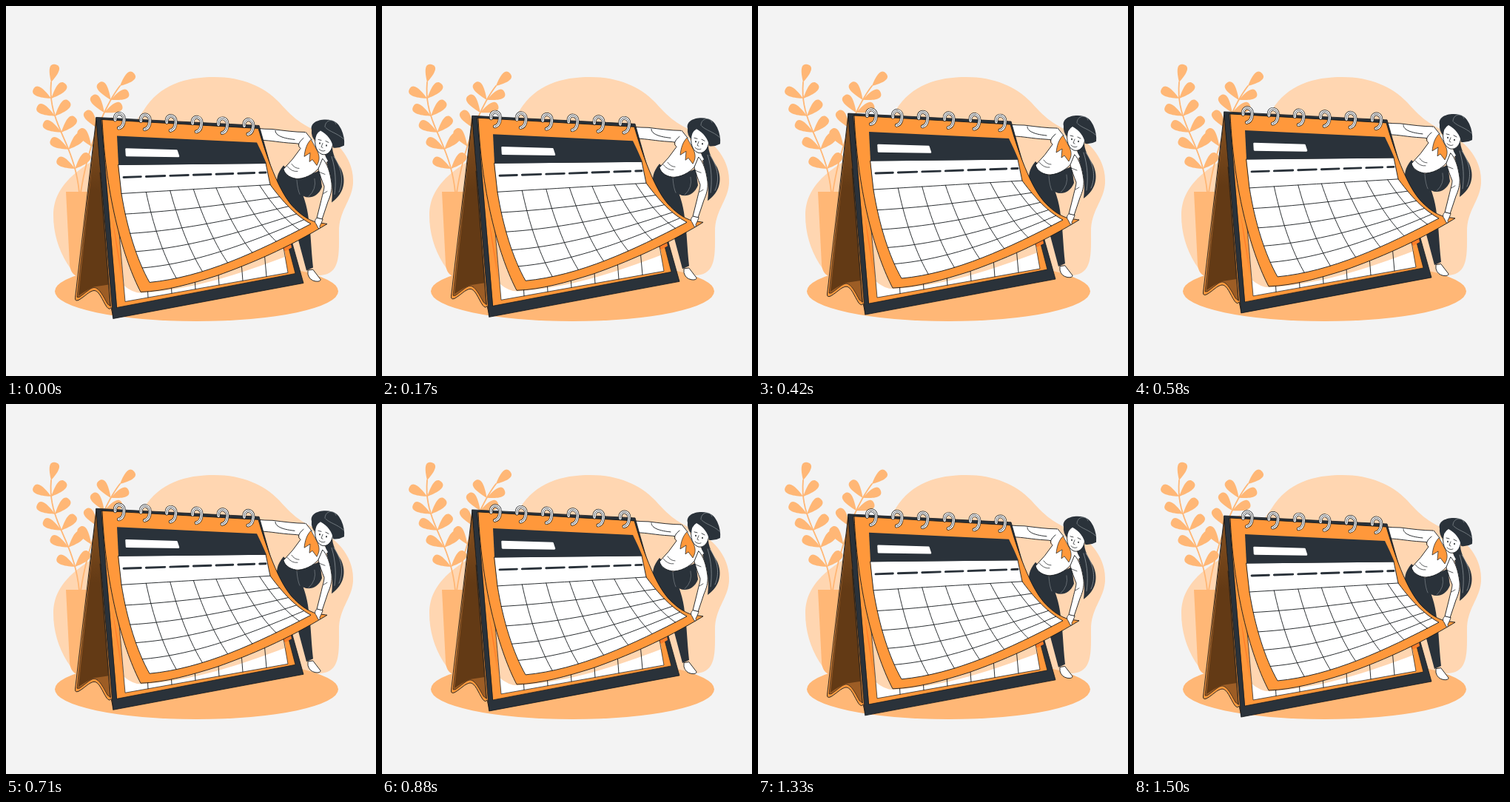
An HTML page with a canvas for the animation above (1540 ms loop, 500 px wide and 500 px high).

```html
<!DOCTYPE html>
<html lang="en">
<head>
<meta charset="utf-8">
<title>Floating calendar</title>
<style>
html, body { margin: 0; width: 100%; height: 100%; overflow: hidden; background: #f3f3f3; }
canvas { display: block; width: 500px; height: 500px; }
</style>
</head>
<body>
<canvas id="stage"></canvas>
<script>
const canvas = document.getElementById('stage');
const ctx = canvas.getContext('2d');
const scale = window.devicePixelRatio || 1;
canvas.width = canvas.height = 500 * scale;

const ORANGE = '#ff983b', MID = '#ffb776', PALE = '#ffd6b1', BROWN = '#9d5d25';
const DARK = '#2a323a', INK = '#15191c', WHITE = '#fff', PAPER = '#f3f3f3';
const LOOP = 1540, STEPS = 37, RISE = 10;

function shape(d, fill, stroke, width = 0.9) {
  const path = new Path2D(d);
  if (fill) { ctx.fillStyle = fill; ctx.fill(path); }
  if (stroke) { ctx.strokeStyle = stroke; ctx.lineWidth = width; ctx.stroke(path); }
}

const line = (d, color = INK, width = 0.9) => shape(d, null, color, width);

function ellipse(x, y, rx, ry, fill) {
  ctx.beginPath();
  ctx.ellipse(x, y, rx, ry, 0, 0, 7);
  ctx.fillStyle = fill;
  ctx.fill();
}

function fade(y0, c0, y1, c1) {
  const g = ctx.createLinearGradient(0, y0, 0, y1);
  g.addColorStop(0, c0);
  g.addColorStop(1, c1);
  return g;
}

const mix = (a, b, t) => [a[0] + (b[0] - a[0]) * t, a[1] + (b[1] - a[1]) * t];

function bezier([a, b, c, d], t) {
  const ab = mix(a, b, t), bc = mix(b, c, t), cd = mix(c, d, t);
  return mix(mix(ab, bc, t), mix(bc, cd, t), t);
}

function sample(point, n = 20) {
  return 'M' + Array.from({ length: n + 1 }, (_, i) => point(i / n)).join('L');
}

// Plants: leaf pairs sit at even steps along a stem.
function leaf([x, y], [dx, dy]) {
  const len = Math.hypot(dx, dy), nx = -dy / len, ny = dx / len;
  const at = (along, side) => `${x + dx * along + nx * side} ${y + dy * along + ny * side}`;
  shape(`M${x} ${y}C${at(0.35, 4.5)} ${at(1, 12)} ${at(1, 0)}C${at(1, -12)} ${at(0.35, -4.5)} ${x} ${y}Z`, MID);
}

function plant(stem, first, step, pairs, tip, left, right) {
  line(sample(t => bezier(stem, t)), MID, 1.8);
  leaf(stem[0], tip);
  for (let i = 0; i < pairs; i++) {
    const base = bezier(stem, first + i * step);
    leaf(base, left);
    leaf(base, right);
  }
}

function drawBackdrop() {
  ctx.fillStyle = PAPER;
  ctx.fillRect(0, 0, 500, 500);
  shape('M186 141C208 106 242 96 282 96C319 96 349 109 369 130C386 149 397 159 420 169' +
    'C451 183 471 210 469 240C467 264 450 276 450 305C450 336 452 362 425 364' +
    'L130 390C91 372 64 330 64 283C64 258 76 238 104 218C148 190 166 170 186 141Z', PALE);
  ellipse(257.5, 385.5, 191.5, 40.5, MID);
  shape('M81 251H132V366H98Q87 363 86 349Z', MID);
  plant([[61, 103], [56, 160], [92, 182], [99, 252]], 0.14, 0.1725, 5, [6, -24], [-24, -13], [19, -20]);
  plant([[154, 108], [138, 128], [112, 180], [101, 252]], 0.23, 0.15, 4, [19, -17], [-16, -23], [24, -10]);
}

function drawWoman() {
  // legs
  shape('M375 215C366 226 364 235 368 247L392 290L394 312L406 357L415 353C412 325 412 305 409 288' +
    'C407 269 402 255 392 232Z', DARK);
  shape('M408 357V362Q410 370 418 371.5Q425 372.500 425 369L415 356Z', WHITE, INK);
  // hair
  shape('M392 234L424 222L427 244C423 254 416 258 409 258C399 258 392 250 392 234Z', DARK);
  shape('M430 195L441 186C440 200 447 209 453 220C460 236 457 253 440 265C442 248 441 234 434 214Z', DARK);
  line('M440 203C446 222 446 240 444 254M443 203C455 220 456 238 450 251', '#aeb4b7', 0.6);
  line('M393 235Q394 248 397 254M417 233Q420 247 409 257', '#8b9297', 0.6);
  // reaching arm and torso
  shape('M340 165Q350 166 360 166C376 168 391 170 404 170L406 187C399 187 394 185 388 185' +
    'C370 184 357 181 346 181Z', WHITE, INK);
  line('M364 168C364 173 370 178 390 180');
  shape('M405 170C394 177 395 184 398 192Q388 207 375 220C377 228 386 233 395 233' +
    'C408 232 419 224 425 216L435 209L428 196L414 180Z', WHITE);
  line('M405 170L413 180M402 178Q391 187 398 192Q388 207 375 220C377 228 386 233 395 233' +
    'C408 232 419 224 425 216');
  line('M380 216Q386 224 394 223M386 213Q390 219 396 219', INK, 0.7);
  // holding arm
  shape('M428 206C434 212 438 224 440 239C441 249 438 257 435 264L427 288L420 286L426 262' +
    'C428 253 430 248 430 243C427 236 424 227 422 220Z', WHITE, INK);
  line('M421 223L431 227M429 253L434 250', INK, 0.7);
  // scarf and face
  shape('M412 180C406 186 404 194 403 203L411 198L410 210L414 207L420 215C424 208 424 203 421 196Z',
    ORANGE, INK, 0.7);
  shape('M419 167C416 182 417 196 427 200C435 202 441 195 442 184L434 166Z', WHITE, INK);
  shape('M413 167C411 159 419 153 432 153C444 153 449 158 453 166Q458 177 457 188Q450 192 442 191' +
    'C441 181 434 173 425 168Q418 172 418 182Q412 176 413 167Z', DARK);
  line('M431 163C431 153 443 151 446 159M432 164C438 170 447 171 456 179', '#9ca4a8', 0.6);
  line('M422 180L426 181M432 182L436 184', INK, 0.8);
  ellipse(424, 185, 0.8, 1.2, INK);
  ellipse(433, 188, 0.8, 1.2, INK);
  line('M428 185L426 190L428 191M423 193Q427 197 431 195', INK, 0.7);
}

function drawStand() {
  shape('M122 151L93.5 394Q93 399 98 397C107 392 112 385 119 384C126 384 130 397 136 406' +
    'Q140 411 142 407L145 420Z', ORANGE, INK);
  shape('M122 155L96 393L99 393C108 387 113 381 119 380C126 380 132 393 137 402L141 405Z',
    BROWN, INK, 0.7);
  shape('M122 160L128 236L139 376L119 379Q111 382 98 391L114 238Z', fade(165, '#85501f', 250, '#633a15'));
  line('M127 225L141 405', INK, 0.7);
}

function drawBoard() {
  shape('M122 150L342 161L402 374L145 422Z', DARK, INK, 0.8);
  shape('M129 153L340 165L391 361L150 407Z', ORANGE, INK, 0.7);
  shape('M144 288L161 382L155 366Z', fade(300, '#ff6f1e', 375, ORANGE));
  shape('M152 295L370 300L381 360L161 399Z', WHITE);
  shape('M152 295L159 377Q173 389 187 387C254 382 315 362 378 338L370 300Z', PALE);
  shape('M372 324L384 317L386 326L377 331Z', '#ff7d29');
  line('M152 295L161 399L381 360L374 320', INK, 0.7);
  for (let x = 192; x < 360; x += 32) line(`M${x - 4} 320L${x} ${399 - (x - 161) * 0.177}`);
}

// The grid is a surface spanned by its four curved edges.
const edge = {
  top: [[156, 253], [223, 249], [290, 245], [357, 241]],
  bottom: [[194, 373], [267, 366], [339, 332], [412, 294]],
  left: [[156, 253], [163.5, 300], [177, 343], [194, 373]],
  right: [[357, 241], [379, 271], [397, 286], [412, 294]]
};

function surface(u, v) {
  const across = mix(bezier(edge.left, v), bezier(edge.right, v), u);
  const down = mix(bezier(edge.top, u), bezier(edge.bottom, u), v);
  const flat = mix(mix(edge.top[0], edge.top[3], u), mix(edge.bottom[0], edge.bottom[3], u), v);
  return [0, 1].map(i => across[i] + down[i] - flat[i]);
}

// Columns narrow slightly with distance.
const columnAt = k => k * 0.168 - k * k * 0.0022;

function drawPage() {
  shape('M130 153L341 165C350 196 368 252 390 273C399 282 409 289 420 292L434 294' +
    'C380 327 330 348 285 364C250 375 215 385 182 386C160 344 135 262 130 153Z', ORANGE, INK);
  shape('M152 214L351 212L357 241C379 271 397 286 412 294C339 332 267 366 194 373' +
    'C177 343 163.500 300 156 253Z', WHITE, INK);
  shape('M150 175L339 184Q346 198 352 212.500L152 214.500Z', DARK);
  shape('M162.500 193L230.500 195L233 202.500L163 201.500Z', WHITE, WHITE, 2.5);
  for (let row = 0; row < 5; row++) line(sample(u => surface(u, row / 5)));
  for (let k = 1; k < 7; k++) line(sample(v => surface(columnAt(k), v)));
  for (let k = 0; k < 7; k++) {
    const from = Math.max(159, surface(columnAt(k), 0)[0]);
    const to = Math.min(351, surface(columnAt(k + 1), 0)[0] - 7);
    const y = x => 231 - (x - 159) * 0.034;
    line(`M${from} ${y(from)}L${to} ${y(to)}`, DARK, 2.9);
  }
}

function drawRing(i) {
  ctx.save();
  ctx.translate(153 + i * 34.9, 142.5 + i * 1.65);
  const d = 'M-5.500 11C-6.500 4 -2 1.500 1.500 2.500C6 4 7.500 9 6 14.500C5 19 2.500 21.500 -0.500 22';
  line(d, INK, 4.8);
  line(d, WHITE, 3.4);
  line(d, INK, 0.7);
  ctx.restore();
}

function drawHand() {
  shape('M420 286C417 288 417 292 419 294L422 300Q425 301 424 297L426 293L428 288Z', WHITE, INK, 0.8);
}

function drawScene(lift) {
  ctx.setTransform(scale, 0, 0, scale, 0, 0);
  ctx.lineCap = ctx.lineJoin = 'round';
  drawBackdrop();
  ctx.translate(0, 1 - lift);
  drawWoman();
  drawStand();
  drawBoard();
  drawPage();
  for (let i = 0; i < 6; i++) drawRing(i);
  drawHand();
}

// Linear rise and fall, stepped at 24 pictures a second on a 10 ms clock.
function liftAt(time) {
  const tick = Math.floor((time % LOOP) / 10) * 10;
  const step = Math.min(STEPS - 1, Math.floor((tick + 4.9) * 0.024));
  const phase = (step + 1) / STEPS;
  return RISE * (1 - Math.abs(1 - 2 * phase));
}

const start = performance.now();
function frame() {
  drawScene(liftAt(performance.now() - start));
  requestAnimationFrame(frame);
}
frame();
</script>
</body>
</html>
```
